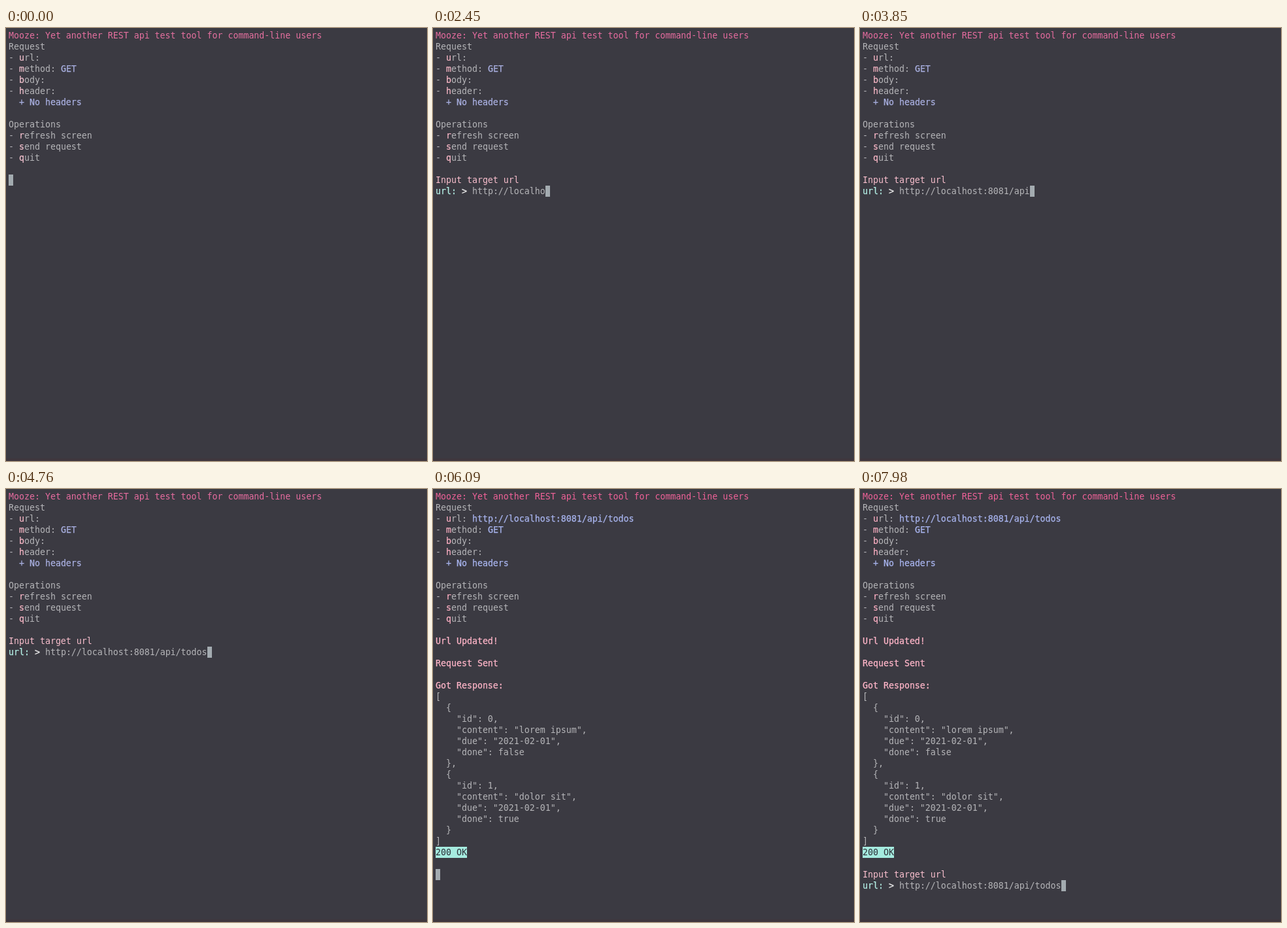
Recreate the animation shown at these times as an HTML page. Size 644 by 662 pixels, loop 8 s.

```html
<!DOCTYPE html>
<html lang="en">
<head>
<meta charset="utf-8">
<title>Terminal REST client</title>
<style>
  html, body { margin: 0; width: 100%; height: 100%; overflow: hidden; background: #3b3a42; }
  body { position: relative; }
  body::after { content: ""; position: absolute; left: 0; right: 0; top: 658px; height: 4px; background: #3f363d; }
  #screen {
    --title: #e5709f; --key: #f5c3d0; --value: #a9afe0;
    position: absolute; left: 4px; top: 3px; margin: 0;
    font: 13.288px/17px "DejaVu Sans Mono", monospace;
    font-variant-ligatures: none; color: #b5b5b8; white-space: pre;
  }
  #screen.editing { --title: #e66c9f; --key: #fbb9c8; }
  #screen.updated { --title: #ef6298; --key: #ffb0c4; --value: #a8b4ee; }
  .title { color: var(--title); }
  .key { color: var(--key); -webkit-text-stroke: .2px; }
  .value { color: var(--value); -webkit-text-stroke: .25px; }
  .notice { color: #ffb5c8; -webkit-text-stroke: .25px; }
  .hint { color: #f9bfcd; }
  .label { color: #b5f0e6; -webkit-text-stroke: .25px; }
  .arrow { color: #eeeeee; -webkit-text-stroke: .25px; }
  .status, #cursor { position: absolute; height: 17px; }
  .status { width: 48px; background: #a5ebdf; color: #2c3038; }
  #cursor { width: 7px; background: #a3abb0; }
</style>
</head>
<body>
<div id="screen"></div>
<script>
const LOOP = 8000, STEP = 70, CELL = 8, ROW = 17;
const URL_TEXT = "http://localhost:8081/api/todos";
const TIMES = { prompt: 420, typing: 555, perKey: 131, updated: 5180, sent: 5600, response: 5670, reopen: 7140 };
const screen = document.getElementById("screen");

const tint = (name, text) => `<span class="${name}">${text}</span>`;
const option = (name, rest = "") => `- ${tint("key", name[0])}${name.slice(1)}${rest}`;

const menu = url => [
  tint("title", "Mooze: Yet another REST api test tool for command-line users"),
  "Request",
  option("url:", url && " " + tint("value", url)),
  option("method:", " " + tint("value", "GET")),
  option("body:"),
  option("header:"),
  "  " + tint("value", "+ No headers"),
  "",
  "Operations",
  option("refresh screen"),
  option("send request"),
  option("quit"),
  ""
];

const prompt = text => [
  tint("hint", "Input target url"),
  `${tint("label", "url:")} ${tint("arrow", "&gt;")} ${text}`
];

const todos = [
  { id: 0, content: "lorem ipsum", due: "2021-02-01", done: false },
  { id: 1, content: "dolor sit", due: "2021-02-01", done: true }
];

function terminalAt(time) {
  const updated = time >= TIMES.updated;
  const lines = menu(updated ? URL_TEXT : "");
  let typed = null;

  if (updated) {
    lines.push(tint("notice", "Url Updated!"), "");
    if (time >= TIMES.sent) lines.push(tint("notice", "Request Sent"), "");
    if (time >= TIMES.response) {
      lines.push(tint("notice", "Got Response:"), ...JSON.stringify(todos, null, 2).split("\n"));
      lines.push(tint("status", "200 OK"), "");
    }
    if (time >= TIMES.reopen) typed = URL_TEXT;
  } else if (time >= TIMES.prompt) {
    const count = Math.max(0, Math.floor((time - TIMES.typing) / TIMES.perKey));
    typed = URL_TEXT.slice(0, count);
  }

  if (typed !== null) lines.push(...prompt(typed));
  const row = typed === null ? lines.length : lines.length - 1;
  const column = typed === null ? 0 : 7 + typed.length;
  const cursor = `<i id="cursor" style="left:${column * CELL}px;top:${row * ROW}px"></i>`;
  const mode = updated ? "updated" : typed === null ? "" : "editing";
  return { mode, html: lines.join("\n") + cursor };
}

let shown = "";
function draw(now) {
  const time = Math.floor(now % LOOP / STEP) * STEP;
  const { mode, html } = terminalAt(time);
  if (html !== shown) {
    screen.className = mode;
    screen.innerHTML = shown = html;
  }
  requestAnimationFrame(() => draw(performance.now() - start));
}
const start = performance.now();
draw(0);
</script>
</body>
</html>
```
